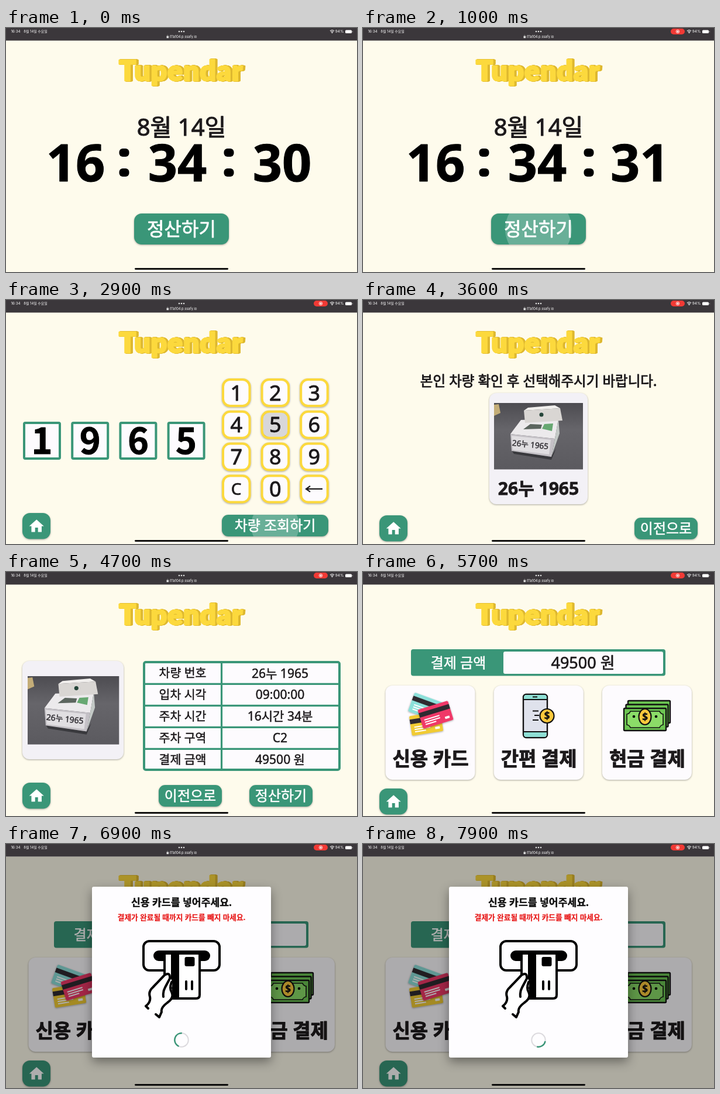
Recreate the animation shown at these times as an HTML page. Size 600 by 417 pixels, loop 8000 ms.

```html
<!DOCTYPE html>
<html lang="ko">
<head>
<meta charset="utf-8">
<style>
html, body { margin: 0; width: 100%; height: 100%; overflow: hidden; background: #fefbec; }
svg { display: block; width: 100vw; height: 100vh; font-family: 'Noto Sans', 'Noto Sans CJK KR', 'Noto Sans CJK JP', sans-serif; }
text { text-anchor: middle; white-space: pre; stroke-linejoin: round; }
.lift { filter: drop-shadow(0 1px 1.5px #0005); }
.logo { font-family: Lato, sans-serif; font-weight: 900; font-size: 48px; letter-spacing: 1px; fill: #fcd93d; stroke: #fcd93d; stroke-width: 2.6;
  filter: drop-shadow(1.3px .8px 0 #deb82f) drop-shadow(1.3px .8px 0 #deb82f) drop-shadow(1.3px .8px 0 #deb82f) drop-shadow(1.3px .8px 0 #deb82f); }
.status { font-family: Inter, 'Noto Sans CJK KR', sans-serif; }
.footed { font-family: 'Noto Sans CJK KR', 'Noto Sans CJK JP', sans-serif; }
.line { fill: none; stroke: #000; stroke-width: 4; stroke-linecap: round; stroke-linejoin: round; }
</style>
</head>
<body>
<svg id="stage" viewBox="0 0 600 417"></svg>
<script>
const GREEN = '#3a9678', YELLOW = '#fcd93d', INK = '#1d1a1c', PAPER = '#fdfbfe';

// Text is placed by its centre.
const text = (x, y, size, str, fill = INK, weight = 400, edge = size * .025, more = '') =>
  `<text x="${x}" y="${y + size * .365}" font-size="${size}" font-weight="${weight}" fill="${fill}" stroke="${fill}" stroke-width="${edge}" ${more}>${str}</text>`;
const box = (x, y, w, h, r, fill, more = '') =>
  `<rect x="${x}" y="${y}" width="${w}" height="${h}" rx="${r}" fill="${fill}" ${more}/>`;
const path = (d, fill, more = '') => `<path d="${d}" fill="${fill}" ${more}/>`;
const group = (body, more = '') => `<g ${more}>${body}</g>`;
const lift = 'class="lift"';
const button = (x, y, w, h, r, size, label) =>
  box(x, y, w, h, r, GREEN, lift) + text(x + w / 2, y + h / 2, size, label, '#fff');
const homeButton = y => box(28, y, 48, 44.5, 13, GREEN, lift) +
  path('M10 20v-6h4v6h5v-8h3L12 3 2 12h3v8z', '#fff', `transform="translate(37.2 ${y + 7.6}) scale(1.25)"`);

const photo = (x, y, scale) => group(
  box(0, 0, 152, 113.5, 0, 'url(#carpet)') +
  path('M0 3L8 2 11 17 0 22z', '#c4ad78') +
  path('M30 81L97 92 106 78 98 97 34 87z', '#39393d') +
  path('M28 53L46 29 110 27 104 61z', '#eceaec') +
  path('M104 61L110 27 112 52 98 92z', '#c3c9c6') +
  path('M51 13L58 8 104 4 113 9z', '#f1efed') + path('M51 13L113 9 117 30 53 34z', '#d9d6d3') +
  '<circle cx="81" cy="20" r="3.5" fill="#26463a"/>' +
  path('M50 45L62 36 82 37 80 44z', '#5c665f') + path('M82 44L86 36 101 35 99 48z', '#67a872') +
  path('M28 53L104 61 98 92 30 82z', '#c4c1c6') + path('M30 56L97 63 94 88 32 80z', '#e0dee1') +
  text(0, 0, 13.5, '26누 1965', '#333136', 400, .5, 'transform="translate(62 71) rotate(6)"'),
  `transform="translate(${x} ${y}) scale(${scale})"`);

const header = '<text class="logo" x="299" y="90">Tupendar</text>';

const colon = x => box(x - 8.5, 206, 17, 14, 6, '#000') + box(x - 8.5, 240, 17, 14, 6, '#000');
const clockText = (x, str) => text(x, 229.5, 88, str, '#000', 700, 1);
const clock = (shift, sec, id) => group(
  clockText(119 + shift, '16') + colon(202 + shift) + clockText(293 + shift, '34') + colon(381 + shift) +
  clockText(472 + shift / 4, sec), `id="${id}"`);
const homePage = text(300, 169, 40, '8월 14일') + clock(0, '30', 'tick0') + clock(5, '31', 'tick1') +
  button(219, 317, 162, 53, 13, 32, '정산하기');

const keyX = i => 369 + i % 3 * 66.6, keyY = i => 134 + Math.floor(i / 3) * 54.8;
const keys = [...'123456789C0'].concat('').map((label, i) =>
  box(keyX(i) + 2, keyY(i) + 2, 45.5, 45, 12, PAPER, `stroke="${YELLOW}" stroke-width="4" ${lift}`) +
  (label ? text(keyX(i) + 24.7, keyY(i) + 24.5, label == 'C' ? 28 : 36, label)
    : path(`M541 ${keyY(i) + 24.5}H513m7 -5l-7 5l7 5`, 'none', `stroke="${INK}" stroke-width="2.2"`))).join('');
const digits = [...'1965'].map((d, i) =>
  box(31 + i * 82.2, 210, 61, 61, 2, PAPER, `stroke="${GREEN}" stroke-width="4"`) +
  text(61.5 + i * 82.2, 241, 61, d, '#000', 700, 1, `id="digit${i}" class="footed"`)).join('');
const keypadPage = digits + keys + button(369, 367, 182, 37, 11, 24, '차량 조회하기') + homeButton(364);

const selectPage = text(300, 138, 23.5, '본인 차량 확인 후 선택해주시기 바랍니다.', INK, 400, .9) +
  box(216, 159, 168, 190, 12, '#f3f1f6', lift) + photo(224, 176, 1) +
  text(300, 322, 30, '26누 1965', INK, 700) + button(464, 372, 108, 37, 11, 24, '이전으로') + homeButton(368);

const rows = ['차량 번호', '26누 1965', '입차 시각', '09:00:00', '주차 시간', '16시간 34분', '주차 구역', 'C2', '결제 금액', '49500 원'];
const detailPage = box(28, 152, 173, 168, 12, '#f3f1f6', lift) + photo(37, 178, 1.028) +
  box(236, 154, 334, 184, 3, PAPER, `stroke="${GREEN}" stroke-width="4"`) +
  path('M368.5 154V338M236 191.3H570M236 228.3H570M236 265.3H570M236 302.3H570', 'none', `stroke="${GREEN}" stroke-width="3.2"`) +
  rows.map((s, i) => text(i % 2 ? 468.5 : 302, 173 + (i >> 1) * 36.8, i % 2 ? 21 : 20.5, s)).join('') +
  button(261, 364, 108, 37, 11, 24, '이전으로') + button(416, 364, 108, 37, 11, 24, '정산하기') + homeButton(360);

const bankCard = (x, y, turn, fill) => group(
  box(-27, -17, 54, 34, 2.5, fill) + box(-27, -11, 54, 8, 0, '#2f2a30') +
  path('M-21 3H6M-21 7H6M-21 11H-2', 'none', 'stroke="#fff" stroke-width="2"') + box(14, 8, 8, 4, 1, '#fff'),
  `transform="translate(${x} ${y}) rotate(${turn})" class="lift"`);
const coin = (x, y, rx, ry) =>
  `<ellipse cx="${x}" cy="${y}" rx="${rx}" ry="${ry}" fill="#fbc93c" stroke="#111" stroke-width="2.2"/>` +
  text(x, y, 17, '$', '#111', 700);
const bill = (x, y) => box(x, y, 72, 38, 1.5, '#6cc552', 'stroke="#111" stroke-width="2.4"');
const cardIcon = bankCard(108, 231, 20, '#8ce0da') + bankCard(108, 259, -9, '#f1cb33') + bankCard(124, 244, -17, '#f03868');
const phoneIcon = box(274, 209, 41, 74, 5, '#dfe2ec', 'stroke="#111" stroke-width="2.4"') +
  path('M275.2 218v-4q0-4 4-4h30.6q4 0 4 4v4zM275.2 273h38.6v5q0 4-4 4h-30.6q-4 0-4-4z', '#8edfd4') +
  path('M290 213.5h8M274 218h41M274 273h41M290 237.5h10M293 245h8M290 253h10', 'none', 'stroke="#111" stroke-width="2"') +
  coin(314.5, 246, 12, 12);
const cashIcon = bill(453, 220) + bill(449.5, 226.5) + bill(446, 233) +
  path('M457 238H507Q508 242 513 243V261Q508 262 507 266H457Q456 262 451 261V243Q456 242 457 238z', '#8bdc68', 'stroke="#111" stroke-width="1.6"') +
  '<circle cx="463" cy="247" r="2.3"/><circle cx="501" cy="247" r="2.3"/>' + coin(482, 247.5, 10.5, 13.5);
const payPage = box(82, 132, 435, 45.5, 4, GREEN) + box(240, 136, 273, 38, 3, PAPER) +
  text(163, 155, 24, '결제 금액', '#fff') + text(376, 155, 27, '49500 원') +
  ['신용 카드', '간편 결제', '현금 결제'].map((s, i) => box(38.5 + i * 185.2, 194, 153, 161, 12, PAPER, lift) +
    text(115.5 + i * 185.2, 319, 33, s, INK, 700, 1)).join('') +
  cardIcon + phoneIcon + cashIcon + homeButton(370);

// Ripples: page, start time, x, y, width, height, corner, colour
const keyPress = (start, i) => [1, start, keyX(i) + 4, keyY(i) + 4, 41.5, 41, 9, '#000'];
const presses = [
  [0, 850, 219, 317, 162, 53, 13, '#fff'],
  keyPress(1300, 0), keyPress(1750, 8), keyPress(2150, 5), keyPress(2500, 4),
  [1, 2800, 369, 367, 182, 37, 11, '#fff'],
  [2, 3850, 216, 159, 168, 190, 12, '#000'],
  [3, 4900, 416, 364, 108, 37, 11, '#fff'],
  [4, 6300, 38.5, 194, 153, 161, 12, '#000'],
];
const ripples = page => presses.map(([p, , x, y, w, h, r, fill], i) =>
  p == page ? box(x, y, w, h, r, fill, `id="ripple${i}"`) : '').join('');

const label = (x, y, size, str) => text(x, y, size, str, '#fff', 400, 0);
const statusBar = group(box(0, 0, 600, 21.5, 0, '#3b373b') +
  label(16.5, 6, 6.2, '16:34') + label(50.5, 6, 5.9, '8월 14일 수요일') +
  [296, 300, 304].map(x => `<circle cx="${x}" cy="6" r="1.3" fill="#ddd"/>`).join('') +
  label(303, 14.8, 5.8, 'i11a104.p.ssafy.io') +
  box(274.5, 14, 3.6, 3.2, .5, '#ddd') + path('M275.3 14v-1q1-1.500 2 0v1', 'none', 'stroke="#ddd" stroke-width=".6"') +
  path('M554 5Q557.5 2 561 5M555.3 6.6Q557.5 4.8 559.7 6.6', 'none', 'stroke="#fff" stroke-width="1.1"') +
  '<circle cx="557.5" cy="8" r="1" fill="#fff"/>' + label(570, 6, 6.4, '94%') +
  box(580, 3.5, 11, 5.5, 1.5, '#fff') + box(591.7, 5, 1, 2.5, .5, '#aaa') +
  group(box(526, 1, 24, 10, 5, '#f13a35') +
    '<circle cx="538" cy="6" r="2.8" fill="none" stroke="#fff" stroke-width=".8"/><circle cx="538" cy="6" r="1.5" fill="#fff"/>', 'id="rec"'),
  'class="status"');

const slotIcon = group(
  '<rect class="line" x="235" y="166" width="130" height="50" rx="10"/>' + box(252, 182, 97, 18, 9, '#000') +
  path('M271 187H331V258Q331 264 325 264H277Q271 264 271 258z', '#fff', 'stroke="#000" stroke-width="4"') +
  box(282, 187, 14, 77, 0, '#000') + box(305.5, 193, 17, 16, 3, '#000') + path('M308 235v13M318 235v13', 'none', 'class="line"') +
  path('M239 277Q248 270 246 261Q243 252 251 245L271 224Q281 218 282 230Q286 238 283 246Q288 262 276 271Q267 280 264 297z', '#fff') +
  '<path class="line" d="M239 277Q248 270 246 261Q243 252 251 245L271 224Q281 218 280 230L272 245Q268 252 269 261M283 236Q279 247 283 253Q288 263 276 271Q264 280 266 287L262 296M239 277L243 281M256 291L262 296"/>', 'id="slot"');
const dialog = box(147, 73, 306, 292, 3, '#fefdff', 'id="sheet" style="filter:drop-shadow(0 7px 9px #0006)"') +
  group(text(300, 100, 17.2, '신용 카드를 넣어주세요.', '#111', 700) +
    text(300, 125, 12.7, '결제가 완료될 때까지 카드를 빼지 마세요.', '#e81c1c', 700, .2), 'id="words"') + slotIcon +
  group('<circle cx="300" cy="335" r="11.7" fill="none" stroke="#dcdade" stroke-width="2"/>' +
    `<circle id="arc" cx="300" cy="335" r="11.7" fill="none" stroke="${GREEN}" stroke-width="2.4"/>`, 'id="spinner"');

const pages = [homePage, keypadPage, selectPage, detailPage, payPage];
const stage = document.getElementById('stage');
stage.innerHTML =
  `<defs><linearGradient id="carpet" x2="0" y2="1"><stop stop-color="#4d4c51"/><stop offset=".4" stop-color="#66656a"/><stop offset="1" stop-color="#5b5a5f"/></linearGradient></defs>` +
  box(0, 0, 600, 417, 0, '#fefbec') + header +
  pages.map((body, i) => group(body + ripples(i), `id="page${i}"`)).join('') +
  box(0, 21.5, 600, 396, 0, '#000', 'id="scrim"') + group(dialog, 'id="dialog"') +
  statusBar + box(220, 410.3, 160, 2.6, 1.3, '#000');

const $ = id => document.getElementById(id);
const show = (id, on) => $(id).style.display = on ? '' : 'none';
const clamp = v => Math.max(0, Math.min(1, v));
const set = (id, name, value) => $(id).setAttribute(name, value);

const pageStarts = [0, 1100, 3050, 4150, 5150];
const digitStarts = [1350, 1800, 2200, 2550];

function draw(t) {
  const page = pageStarts.filter(s => t >= s).length - 1;
  pages.forEach((_, i) => show('page' + i, i == page));
  show('tick0', t < 600);
  show('tick1', t >= 600);
  show('rec', t >= 400);
  digitStarts.forEach((s, i) => show('digit' + i, t >= s));

  presses.forEach(([, start, , , w, h], i) => {
    const age = t - start, el = $('ripple' + i);
    show('ripple' + i, age >= 0 && age < 550);
    el.style.clipPath = `circle(${Math.hypot(w, h) / 2 * clamp(age / 225)}px)`;
    el.style.opacity = .24 * clamp((550 - age) / 250);
  });

  const u = clamp((t - 6455) / 225), p = 1 - (1 - u) ** 2;
  const loaded = t >= 6700, height = loaded ? 292 : 152, top = 219 - height / 2;
  const scale = .9 + .1 * p;
  show('scrim', u > 0);
  show('dialog', u > 0);
  $('scrim').style.opacity = .32 * u ** 1.5;
  $('dialog').style.opacity = Math.min(1, p * 1.2);
  set('dialog', 'transform', `translate(300 219) scale(${scale}) translate(-300 -219)`);
  set('sheet', 'y', top);
  set('sheet', 'height', height);
  set('words', 'transform', `translate(0 ${top - 73})`);
  set('spinner', 'transform', `translate(0 ${top + height - 365})`);
  show('slot', loaded);

  const turn = (t - 7900) / 1400;
  set('arc', 'transform', `rotate(${10 + 360 * turn} 300 335)`);
  set('arc', 'stroke-dasharray', `${19 + 14 * Math.sin(2 * Math.PI * turn)} 80`);
}

function loop() {
  draw(Math.floor(performance.now() % 8000 / 100) * 100);
  requestAnimationFrame(loop);
}
loop();
</script>
</body>
</html>
```
